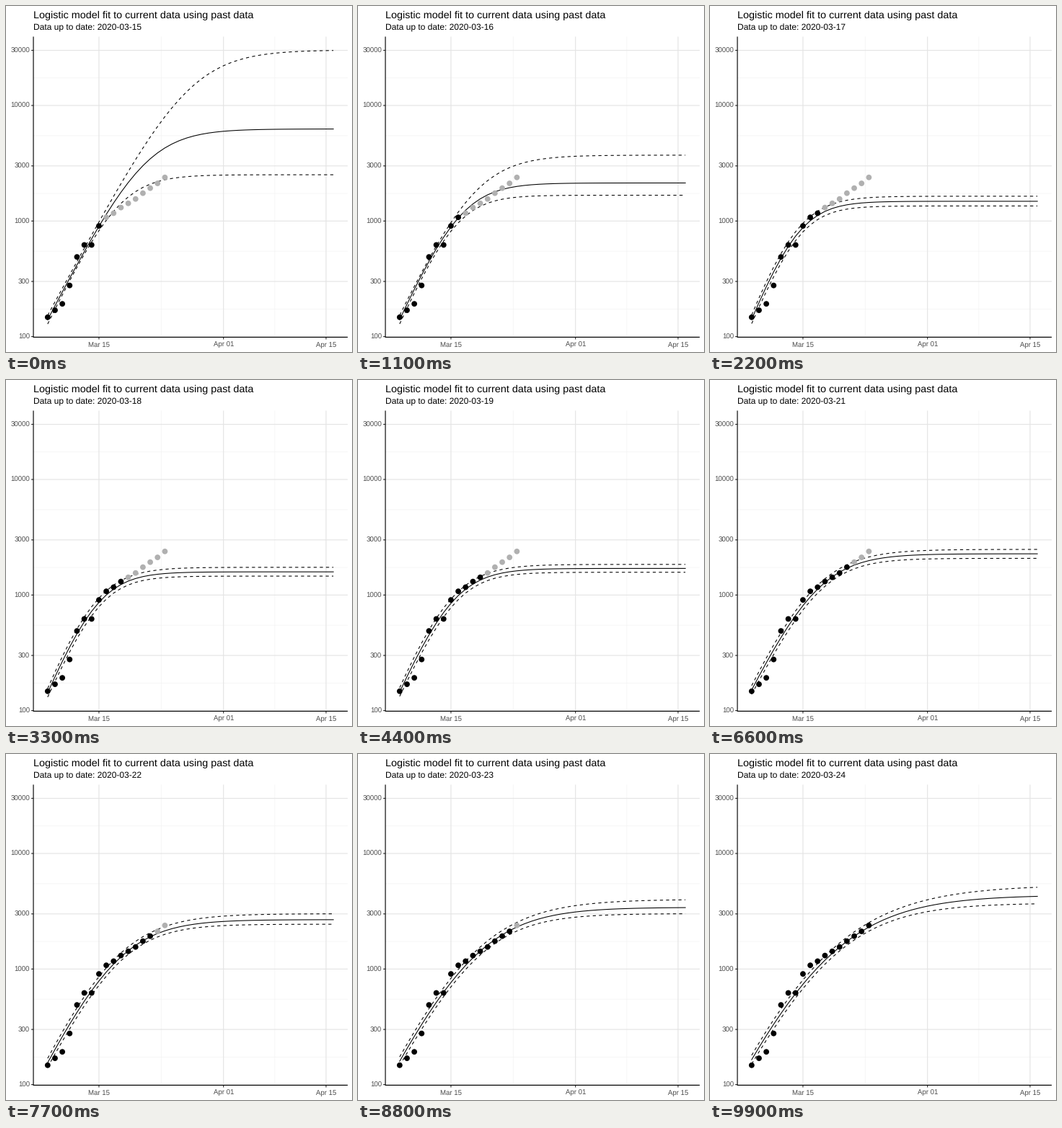
A matplotlib script that plays this animation: 480x480 px, repeating every 10 s.

```python
import matplotlib.pyplot as plt
import numpy as np
from matplotlib.animation import FuncAnimation

SIZE, DPI = 480, 72
LEFT, RIGHT, TOP, BOTTOM = 38, 474, 42.5, 459.5
FRAMES, INTERVAL, HOLD = 100, 100, 11

plt.rcParams["font.family"] = ["Liberation Sans", "DejaVu Sans"]
plt.rcParams["text.hinting"] = "none"

counts = np.array([147, 169, 192, 277, 489, 621, 621, 907, 1077, 1169,
                   1308, 1423, 1552, 1742, 1926, 2118, 2385])
days = np.arange(40)

# Plateaus (lower, middle, upper) at a few steps; log-interpolated between
KEY_STEPS = [0, 1, 2, 4, 6, 7, 9]
PLATEAUS = {
    -1: [2515, 1672, 1350, 1574, 2077, 2443, 3725],
    0: [6261, 2135, 1482, 1699, 2274, 2675, 4370],
    1: [30200, 3716, 1639, 1841, 2483, 3010, 5340],
}


def px(day):
    return 57.8 + 10.163 * np.asarray(day)


def py(value):
    return 458.6 - 160.3 * (np.log10(value) - 2)


def fit(step, side):
    """Generalised logistic curve; side is -1, 0 or 1 for the band."""
    plateau = np.exp(np.interp(step, KEY_STEPS, np.log(PLATEAUS[side])))
    spread = 1.09 ** side
    start = (140 + .3 * step ** 2) * spread
    week = (900 - 9 * step - step ** 2) * spread
    shape = 1 - .55 * (step / 9) ** 4 - .1 * side
    a = (plateau / start) ** shape - 1
    b = (plateau / week) ** shape - 1
    return plateau * (1 + a * (b / a) ** (days / 7)) ** (-1 / shape)


fig = plt.figure(figsize=(SIZE / DPI, SIZE / DPI), dpi=DPI, facecolor="white")
ax = fig.add_axes([0, 0, 1, 1])
ax.set(xlim=(0, SIZE), ylim=(SIZE, 0))
ax.axis("off")


def line(x, y, color, width=1.16, z=1):
    ax.plot(x, y, color=color, lw=width, zorder=z, snap=False,
            solid_capstyle="butt")


def label(x, y, text, size, color="black", **align):
    return ax.text(x, y, text, fontsize=size, color=color, **align)


def grid_x(x, color, width=1.16):
    line([x, x], [TOP, BOTTOM], color, width)


def grid_y(y, color, width=1.16):
    line([LEFT, RIGHT], [y, y], color, width)


x_ticks = {7: "Mar 15", 24: "Apr 01", 38: "Apr 15"}
y_ticks = [100, 300, 1000, 3000, 10000, 30000]

# Minor grid lies halfway between the ticks
for ticks, draw in ((px(list(x_ticks)), grid_x), (py(y_ticks), grid_y)):
    for middle in (ticks[:-1] + ticks[1:]) / 2:
        draw(middle, "#f3f3f3", .7)

for value in y_ticks:
    y = py(value)
    grid_y(y, "#e4e4e4")
    line([LEFT - 3, LEFT], [y, y], "#333333")
    label(33, y + 3.4, str(value), 9.6, "#4d4d4d", ha="right")
for day, name in x_ticks.items():
    x = px(day)
    grid_x(x, "#e4e4e4")
    line([x, x], [BOTTOM, BOTTOM + 3], "#333333")
    label(x, 473, name, 9.6, "#4d4d4d", ha="center")
line([LEFT, LEFT, RIGHT], [TOP, BOTTOM, BOTTOM], "black", z=5)

label(LEFT, 17, "Logistic model fit to current data using past data", 14.4)
subtitle = label(LEFT, 34, "", 12)

curves = {side: ax.plot([], [], color="black", lw=1.07, zorder=3,
                        ls=(0, (4, 4)) if side else "-",
                        dash_capstyle="butt")[0]
          for side in PLATEAUS}
dots = ax.scatter(px(np.arange(len(counts))), py(counts), s=7.8 ** 2, lw=0,
                  zorder=4)


def update(frame):
    step = frame // HOLD
    subtitle.set_text(f"Data up to date: 2020-03-{15 + step}")
    for side, curve in curves.items():
        curve.set_data(px(days), py(fit(step, side)))
    dots.set_facecolor(["black" if day <= 7 + step else "#b0b0b0"
                        for day in range(len(counts))])
    return [subtitle, dots, *curves.values()]


anim = FuncAnimation(fig, update, frames=FRAMES, interval=INTERVAL,
                     repeat=True, repeat_delay=0)
plt.show()
```
